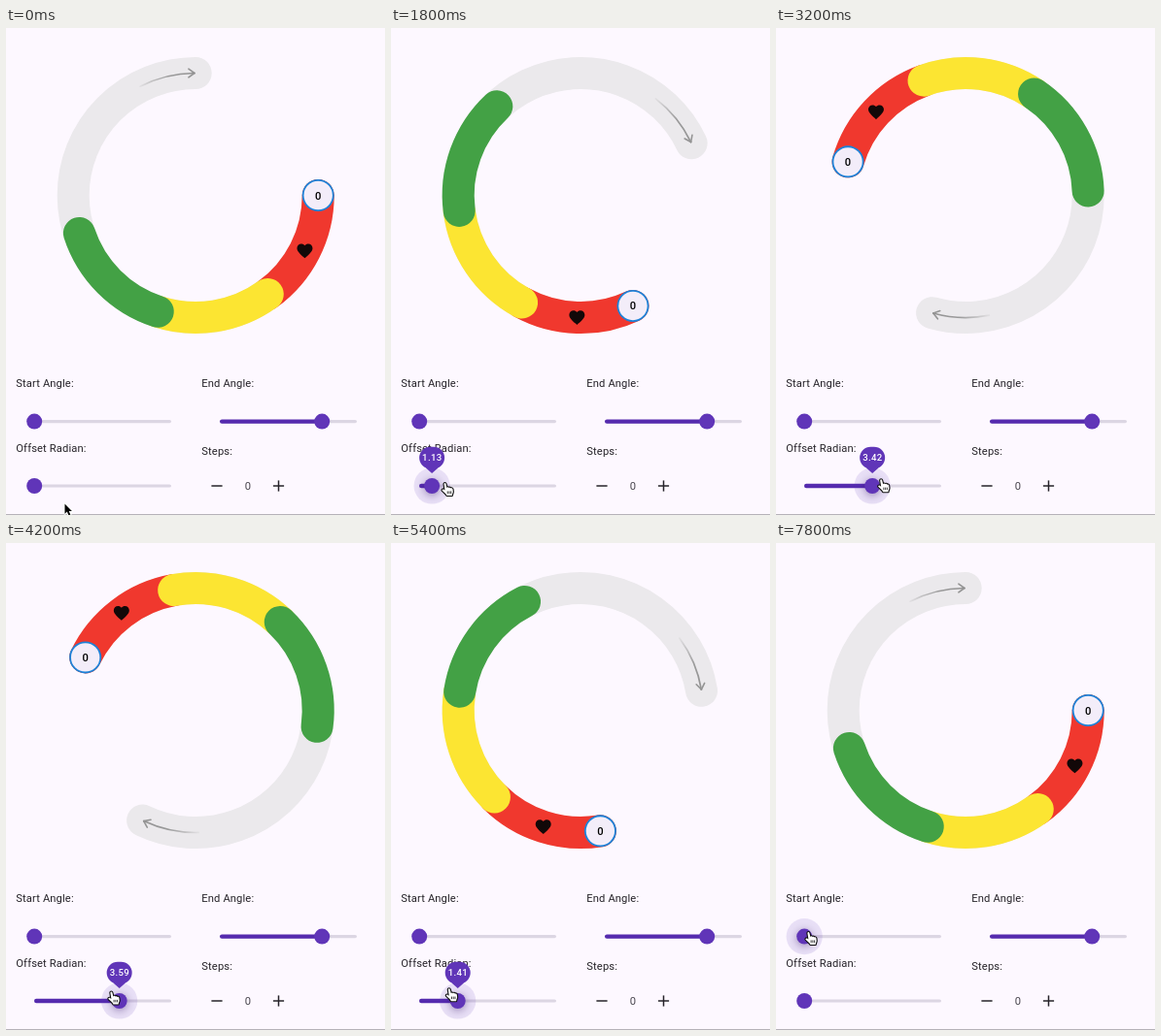
Write an HTML page with a canvas that moves like this. It is 390 px wide and 502 px high and loops after 8000 ms.

```html
<!DOCTYPE html>
<html lang="en">
<head>
<meta charset="utf-8">
<title>Arc slider</title>
<style>
html, body { margin: 0; width: 100%; height: 100%; overflow: hidden; background: #fdf8ff; }
canvas { display: block; width: 390px; height: 502px; }
</style>
</head>
<body>
<canvas id="stage"></canvas>
<script>
const W = 390, H = 502, LOOP = 8000, STEP = 200, TAU = Math.PI * 2;
const CX = 195.2, CY = 172.5, R = 126, BAND = 33;
const SWEEP = Math.PI * 1.5, PART = SWEEP / 5;
const PURPLE = '#6035b8', INK = '#262329', GREY = '#949494';
const SLIDER_X = 29.2, SLIDER_W = 140;

const canvas = document.getElementById('stage');
const ctx = canvas.getContext('2d');
const ratio = window.devicePixelRatio || 1;
canvas.width = W * ratio;
canvas.height = H * ratio;

const heart = new Path2D('M12 21.35l-1.45-1.32C5.4 15.36 2 12.28 2 8.5 2 5.42 4.42 3 7.5 3c1.74 0 3.41.81 4.5 2.09C13.09 3.81 14.76 3 16.5 3 19.58 3 22 5.42 22 8.5c0 3.78-3.4 6.86-8.55 11.54L12 21.35z');
const pointer = new Path2D('M0 0V10.2L2.3 8.1 4 12 5.9 11.2 4.2 7.4H7.4Z');
const hand = new Path2D('M.2 1C.4-.2 1.9-.2 2.2 1L3.2 5C3.7 4.1 5 4.2 5.3 5.1 5.9 4.4 7.1 4.6 7.3 5.6 8 5 9 5.4 9.2 6.4L9.5 9C9.5 10.3 8.6 11.3 8.5 13H3.2C2.6 11.3.2 9.6-1.5 7.9-2.3 7-1.2 6-.2 6.6L1.2 7.6Z');

// turning points of the drag: seconds, radians
const drag = [[1, 0], [1.4, .03], [1.8, 1.13], [2.4, 1.1], [3, 3.14], [3.8, 4.26], [4.2, 3.59], [6, .32], [6.4, 0]];
const cursorY = [[0, 490.5], [.8, 470], [1.8, 469], [6.2, 457], [7.2, 461], [7.8, 401]];

function track(keys, t) {
  if (t <= keys[0][0]) return keys[0][1];
  for (let i = 1; i < keys.length; i++) {
    const [t0, a] = keys[i - 1], [t1, b] = keys[i];
    if (t <= t1) return a + (b - a) * (t - t0) / (t1 - t0);
  }
  return keys[keys.length - 1][1];
}

const offsetAt = t => track(drag, t);
const knobX = radians => SLIDER_X + SLIDER_W * radians / TAU;
const onRing = a => [CX + R * Math.cos(a), CY + R * Math.sin(a)];

function disc(x, y, r, fill) {
  ctx.fillStyle = fill;
  ctx.beginPath();
  ctx.arc(x, y, r, 0, TAU);
  ctx.fill();
}

function line(x0, y0, x1, y1, width, color, cap = 'butt') {
  ctx.lineWidth = width;
  ctx.lineCap = cap;
  ctx.strokeStyle = color;
  ctx.beginPath();
  ctx.moveTo(x0, y0);
  ctx.lineTo(x1, y1);
  ctx.stroke();
}

function text(str, x, y, { size = 11.2, weight = 400, color = INK, align = 'left', gap = .12 } = {}) {
  ctx.font = `${weight} ${size}px Roboto, sans-serif`;
  ctx.letterSpacing = gap + 'px';
  ctx.textAlign = align;
  ctx.fillStyle = color;
  ctx.fillText(str, x, y);
}

function band(from, to, color) {
  ctx.lineWidth = BAND;
  ctx.lineCap = 'round';
  ctx.strokeStyle = color;
  ctx.beginPath();
  ctx.arc(CX, CY, R, from, to);
  ctx.stroke();
}

function arrow(end) {
  const span = SWEEP / 10, top = -Math.PI / 2;
  ctx.save();
  ctx.translate(CX, CY);
  ctx.rotate(end - top);
  const fade = ctx.createLinearGradient(-R * Math.sin(span), 0, 0, 0);
  fade.addColorStop(0, 'rgba(140,140,140,0.1)');
  fade.addColorStop(.5, 'rgba(140,140,140,0.85)');
  fade.addColorStop(1, GREY);
  ctx.strokeStyle = fade;
  ctx.lineWidth = 1.7;
  ctx.beginPath();
  ctx.arc(0, 0, R, top - span, top - .01);
  ctx.stroke();
  line(-7.3, -R - 4.3, -1.3, -R, 1.6, GREY, 'round');
  line(-7.3, -R + 4.3, -1.3, -R, 1.6, GREY, 'round');
  ctx.restore();
}

function ring(offset) {
  band(offset, offset + SWEEP, '#ebe9ec');
  arrow(offset + SWEEP);
  ['#f0382e', '#fce532', '#43a145'].forEach((color, i) =>
    band(offset + PART * i, offset + PART * (i + 1), color));

  const [hx, hy] = onRing(offset + PART / 2);
  ctx.save();
  ctx.translate(hx, hy);
  ctx.scale(.8, .8);
  ctx.translate(-12, -12);
  ctx.fillStyle = '#120808';
  ctx.fill(heart);
  ctx.restore();

  const [x, y] = onRing(offset);
  disc(x, y, 16.5, '#1c82d8');
  disc(x, y, 14.7, '#f3edf9');
  text('0', x, y + 4, { weight: 500, align: 'center', color: '#000', gap: 0 });
}

function slider(x, y, part, active) {
  const thumb = x + SLIDER_W * part;
  line(x + 1.6, y, x + SLIDER_W - .8, y, 3.2, '#dcd6e3', 'round');
  if (part > 0) line(x + 2, y, thumb, y, 4.4, '#552bae', 'round');
  if (active) disc(thumb, y, 18.6, 'rgba(96,53,184,0.13)');
  ctx.save();
  if (active) {
    ctx.shadowColor = 'rgba(40,10,90,0.4)';
    ctx.shadowBlur = 8 * ratio;
    ctx.shadowOffsetY = 2 * ratio;
  }
  disc(thumb, y, 8, PURPLE);
  ctx.restore();
}

function balloon(x, y, label) {
  ctx.fillStyle = PURPLE;
  ctx.beginPath();
  ctx.roundRect(x - 13, y - 11.3, 26, 22.6, 11.3);
  ctx.moveTo(x - 8.5, y + 8.5);
  ctx.lineTo(x + 8.5, y + 8.5);
  ctx.lineTo(x, y + 16);
  ctx.fill();
  text(label, x + .2, y + 3.4, { size: 9.6, weight: 500, color: '#fff', align: 'center', gap: .35 });
}

function cursor(shape, x, y, fill, edge) {
  ctx.save();
  ctx.translate(x, y);
  ctx.lineJoin = 'round';
  ctx.lineWidth = 2.2;
  ctx.strokeStyle = edge;
  ctx.fillStyle = fill;
  ctx.stroke(shape);
  ctx.fill(shape);
  if (shape === hand) {
    for (const fx of [3.9, 5.7, 7.4]) line(fx, 8.4, fx, 11, .8, edge);
  }
  ctx.restore();
}

function draw(ms) {
  const t = Math.floor(ms / STEP) * STEP / 1000;
  const offset = offsetAt(t);
  // the knob trails the value by one step
  const knob = offsetAt(t - STEP / 1000);
  const dragging = t >= 1 && t < 7;

  ctx.setTransform(ratio, 0, 0, ratio, 0, 0);
  ctx.fillStyle = '#fdf8ff';
  ctx.fillRect(0, 0, W, H);
  ring(offset);

  text('Start Angle:', 10.3, 370.3);
  text('End Angle:', 201.3, 370.3);
  text('Offset Radian:', 10.3, 437);
  text('Steps:', 201.3, 440);
  slider(SLIDER_X, 405.6, 0, t >= 7.7);
  slider(220.2, 405.6, SWEEP / TAU, false);
  slider(SLIDER_X, 472, knob / TAU, dragging);

  line(211.4, 472, 222.6, 472, 1.5, INK);
  line(274.9, 472, 286.1, 472, 1.5, INK);
  line(280.5, 466.4, 280.5, 477.6, 1.5, INK);
  text('0', 249, 476, { align: 'center', color: '#48454e', gap: 0 });
  line(0, 501.5, W, 501.5, 1, '#b5b1b8');

  if (t >= 1.2 && dragging) balloon(knobX(knob), 443, offset.toFixed(2));

  const y = track(cursorY, t);
  if (t < .8) cursor(pointer, 60.5 - 37 * t, y, '#000', '#fff');
  else cursor(hand, knobX(offsetAt(t + .05)) + track([[6.4, 0], [7.8, 3]], t), y, '#fff', '#111');
}

const begin = performance.now();
function tick() {
  draw((performance.now() - begin) % LOOP);
  requestAnimationFrame(tick);
}
tick();
</script>
</body>
</html>
```
